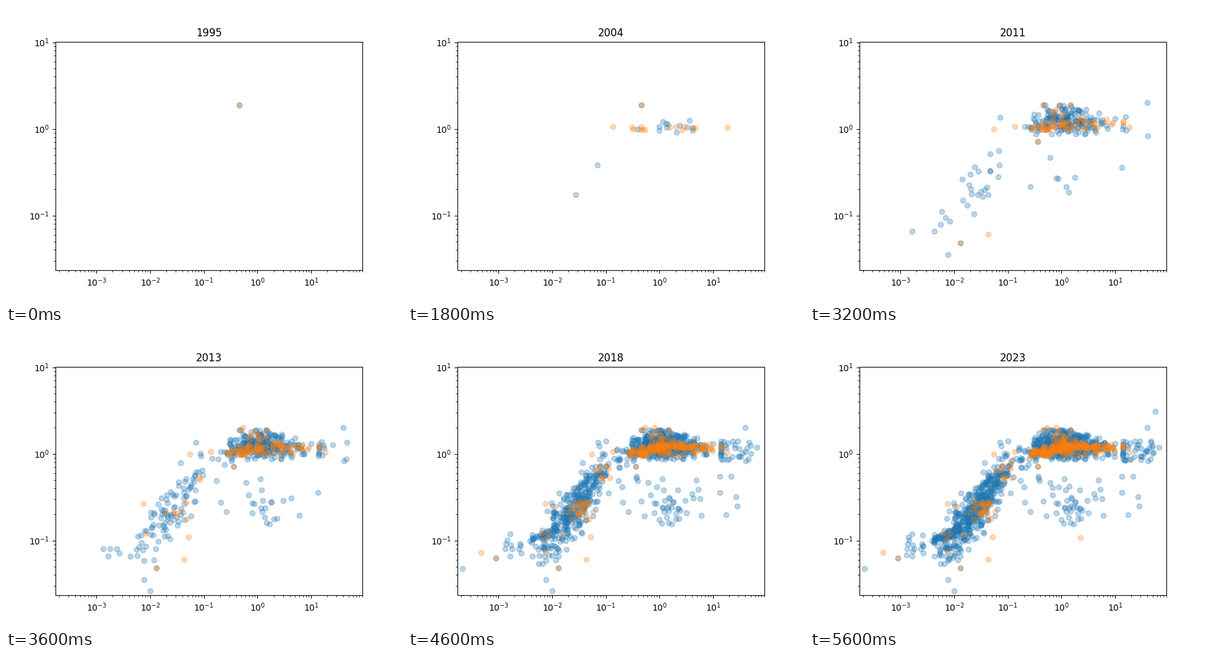
Recreate the animation shown at these times as a matplotlib script. Size 640 by 480 pixels, loop 5800 ms.

```python
import numpy as np
import matplotlib.pyplot as plt
from matplotlib.animation import FuncAnimation

FIRST, LAST = 1995, 2023
rng = np.random.default_rng(11)

# Stand-out points: year, mass, radius
SHARED = [(1995, 0.46, 1.9), (2001, 4.1, 1.03), (2007, 1.47, 1.9),
          (2008, 0.36, 0.715), (2011, 0.0129, 0.0485), (2018, 0.0009, 0.063)]
COOL = [(2004, 0.07, 0.38), (2004, 0.0273, 0.175), (2009, 40, 2.0),
        (2012, 0.01, 0.0264), (2014, 0.00021, 0.047), (2022, 56.5, 3.07)]
WARM = [(2002, 18.4, 1.05), (2014, 0.00047, 0.073), (2021, 2.27, 0.107)]


def normal(mean, sd, n):
    return mean + sd * np.clip(rng.normal(size=n), -2.4, 2.4)


def group(mass, radius, start, end=LAST):
    """Points in log units whose count grows as a smoothstep over the years."""
    n = len(mass)
    u = (np.arange(n) + 0.5) / n
    t = 0.5 - np.sin(np.arcsin(1 - 2 * u) / 3)
    born = np.ceil(start + (end - start) * t)
    return np.column_stack([born, 10 ** mass, 10 ** radius])


def cloud(n, mass, radius, start, end=LAST):
    return group(normal(*mass, n), normal(*radius, n), start, end)


def box(n, mass, radius, start, end=LAST):
    return group(rng.uniform(*mass, n), rng.uniform(*radius, n), start, end)


def giants(n):
    m = normal(-0.06, 0.29, n)
    r = 0.11 - 0.5 * np.maximum(0, -0.36 - m) + normal(0, 0.07, n)
    return group(m, r, 2005)


def heavy(n):
    m = 0.2 + np.minimum(rng.exponential(0.36, n), 0.95)
    return group(m, normal(0.07, 0.055, n), 2005)


def small(n):
    m = normal(-1.58, 0.33, n)
    spread = np.linspace(0.19, 0.09, n)  # later finds lie closer together
    r = -0.63 + 0.75 * (m + 1.58) + 0.1 * (m + 1.58) ** 2
    return group(m, r + spread * normal(0, 1, n), 2009)


def rocky(n):
    m = rng.uniform(-2.42, -1.9, n)
    return group(m, -1 + 0.25 * (m + 2.42) + normal(0, 0.02, n), 2014)


def ridge(n):
    m = np.abs(normal(0, 0.48, n) + 0.62) - 0.62
    r = 0.045 + 0.04 * np.tanh((m + 0.2) / 0.25)
    return group(m, r + normal(0, 0.018, n), 2006)


cool = np.vstack([
    SHARED, COOL,
    cloud(18, (0.15, 0.3), (0.06, 0.05), 1995, 2010),
    giants(530), heavy(115), small(470), rocky(55),
    box(38, (1.1, 1.82), (-0.08, 0.17), 2008),
    cloud(24, (0.15, 0.14), (-0.63, 0.09), 2009, 2016),
    box(34, (-0.85, 1.5), (-0.75, -0.2), 2009, 2020),
    box(34, (-2.9, -1.95), (-1.22, -0.9), 2009),
]).T
warm = np.vstack([
    SHARED, WARM,
    cloud(20, (-0.3, 0.4), (0.015, 0.012), 1996, 2010),
    ridge(130),
    cloud(66, (-0.02, 0.21), (0.11, 0.08), 2006),
    box(16, (0.5, 1.06), (0.02, 0.1), 2009),
    cloud(22, (-1.47, 0.1), (-0.64, 0.045), 2011, 2020),
    box(14, (-2.3, -1.1), (-1.25, -0.55), 2010, 2016),
    box(10, (-1.2, -0.9), (-0.3, -0.05), 2010, 2020),
]).T

fig, ax = plt.subplots(figsize=(6.4, 4.8), dpi=100)
ax.set_xscale("log")
ax.set_yscale("log")
ax.set_xlim(10 ** -3.766, 10 ** 1.956)
ax.set_ylim(10 ** -1.633, 10 ** 1.0068)
title = ax.set_title(str(FIRST))
layers = [(ax.scatter([], [], s=36, color=c, alpha=0.3), pts)
          for c, pts in (("C0", cool), ("C1", warm))]


def update(i):
    year = FIRST + i
    title.set_text(str(year))
    for dots, (born, mass, radius) in layers:
        seen = born <= year
        dots.set_offsets(np.column_stack([mass[seen], radius[seen]]))
    return [title] + [dots for dots, _ in layers]


anim = FuncAnimation(fig, update, frames=LAST - FIRST + 1, interval=200,
                     repeat=True, repeat_delay=0, blit=False)
plt.show()
```
